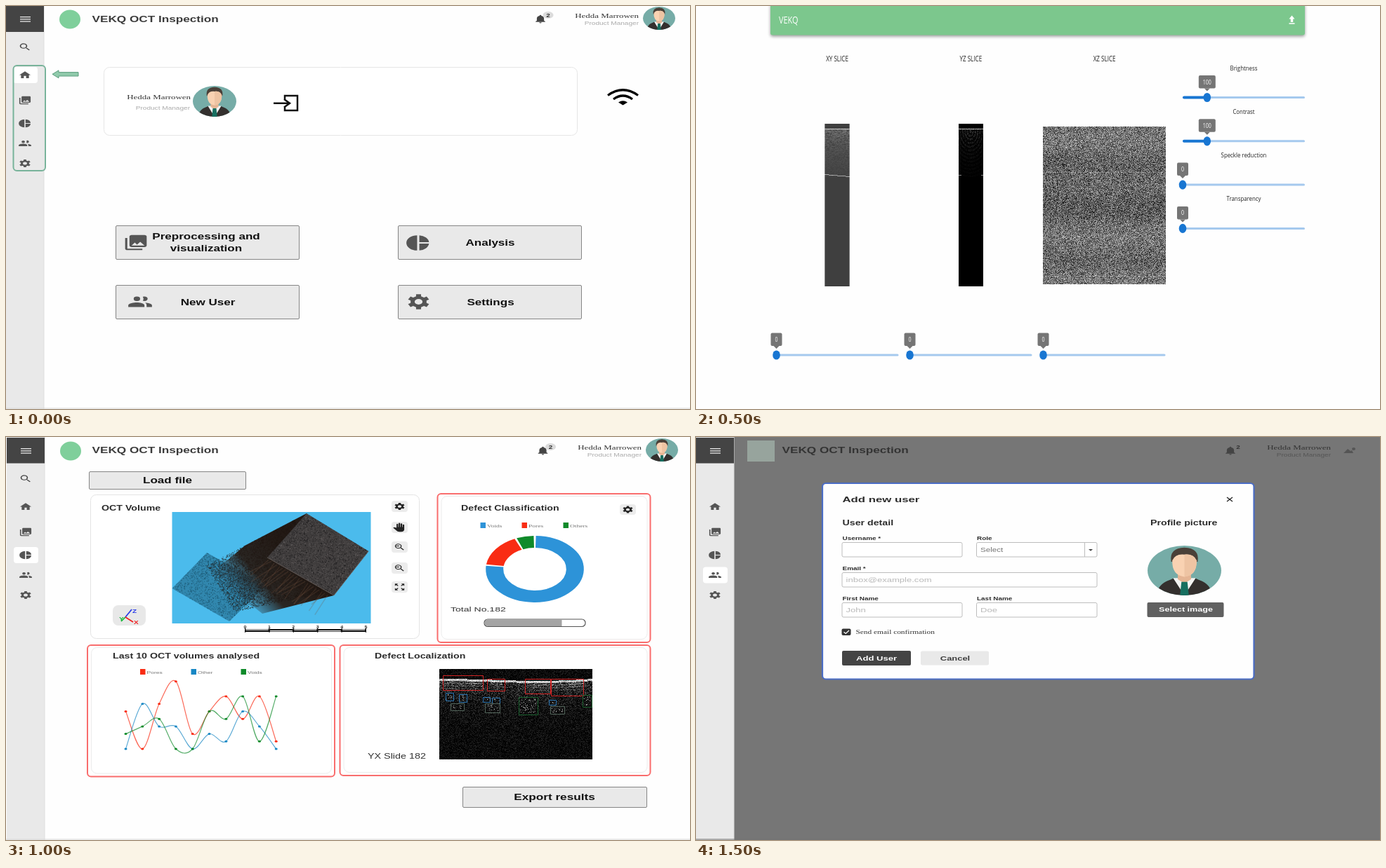
These frames come from a looping animation (974 by 575 pixels, 2 s). An HTML page with a canvas:

```html
<!DOCTYPE html>
<html lang="en">
<head>
<meta charset="utf-8">
<title>OCT inspection interface</title>
<style>
html, body { margin: 0; width: 974px; height: 575px; overflow: hidden; background: #fefefe; }
canvas { display: block; }
</style>
</head>
<body>
<canvas id="stage" width="974" height="575"></canvas>
<script>
const W = 974, H = 575, HOLD = 500;
const SANS = '"Liberation Sans", Arial, sans-serif';
const SERIF = '"Liberation Serif", Times, serif';
const UI = '"Open Sans", "Noto Sans", sans-serif';
const DARK = '#444', PANEL = '#e9e9e9', RED = '#f92c13', BLUE = '#2d93d8', GREEN = '#0f8a2a';

let g;          // context being painted
let wide = 1;   // horizontal aspect of the whole screen
let seed = 7;
const rand = () => (seed = (seed * 16807) % 2147483647) / 2147483647;

const ICONS = {
  home: 'M10 20v-6h4v6h5v-8h3L12 3 2 12h3v8z',
  search: 'M15.5 14h-.8l-.3-.3A6.5 6.5 0 1 0 13.7 14.4l.3.3v.8l5 5 1.5-1.5zm-6 0a4.5 4.5 0 1 1 0-9 4.5 4.5 0 0 1 0 9z',
  images: 'M22 16V4c0-1.1-.9-2-2-2H8c-1.1 0-2 .9-2 2v12c0 1.1.9 2 2 2h12c1.1 0 2-.9 2-2zm-11-4l2 2.7L16 11l4 5H8zM2 6v14c0 1.1.9 2 2 2h14v-2H4V6z',
  pie: 'M11 2v20a10 10 0 0 1 0-20zm2 0v9h9a10 10 0 0 0-9-9zm0 11v9a10 10 0 0 0 9-9z',
  people: 'M16 11a3 3 0 1 0-1.5-5.6q1.2 2.6 0 5.2a3 3 0 0 0 1.5.4zM9 11a3 3 0 1 0 0-6 3 3 0 0 0 0 6zm0 2c-2.6 0-8 1.2-8 3.7V19h15v-2.3c0-2.5-4.5-3.7-7-3.7zm7.5.1c1.2.9 1.5 2 1.5 3.5V19h5v-2.4c0-2-3.5-3.2-6.5-3.5z',
  bell: 'M12 22a2 2 0 0 0 2-2h-4a2 2 0 0 0 2 2zm6-6v-5c0-3.1-1.6-5.6-4.5-6.3V4a1.5 1.5 0 0 0-3 0v.7C7.6 5.4 6 7.9 6 11v5l-2 2v1h16v-1z',
  upload: 'M9 16h6v-6h4l-7-7-7 7h4zm-4 2h14v2H5z',
  expand: 'M15 3h6v6l-2.3-2.3-3 3-1.4-1.4 3-3zM3 9V3h6L6.700 5.300l3 3-1.400 1.400-3-3zM9 21H3v-6l2.300 2.300 3-3 1.400 1.400-3 3zM21 15v6h-6l2.300-2.300-3-3 1.400-1.400 3 3z',
  hand: 'M7 13V5a1.3 1.3 0 0 1 2.600 0v6h.7V3a1.300 1.300 0 0 1 2.600 0v8h.7V4a1.300 1.300 0 0 1 2.600 0v7h.7V6.500a1.300 1.300 0 0 1 2.600 0V17q0 5-5 5h-3q-3 0-5-3l-5-6q1.500-2 3-1z',
  gear: gearPath()
};

function gearPath() {
  let d = '';
  for (let i = 0; i < 24; i++) {
    const a = (Math.floor(i / 4) * 60 - 90 + [-13, 13, 18, 42][i % 4]) * Math.PI / 180;
    const r = i % 4 < 2 ? 10 : 7.4;
    d += `${i ? 'L' : 'M'}${12 + r * Math.cos(a)} ${12 + r * Math.sin(a)}`;
  }
  return d + 'zM8.4 12a3.6 3.6 0 1 0 7.200 0a3.600 3.600 0 1 0-7.200 0z';
}

function paint(path, fill, stroke, lw = 1) {
  if (fill) { g.fillStyle = fill; g.fill(path, 'evenodd'); }
  if (stroke) { g.strokeStyle = stroke; g.lineWidth = lw; g.stroke(path); }
}
const shape = (d, fill, stroke, lw) => paint(new Path2D(d), fill, stroke, lw);

function box(x, y, w, h, fill, stroke, r = 0, lw = 1) {
  const p = new Path2D();
  p.roundRect(x, y, w, h, r);
  paint(p, fill, stroke, lw);
}

function oval(x, y, rx, ry, fill) {
  const p = new Path2D();
  p.ellipse(x, y, rx, ry, 0, 0, 7);
  paint(p, fill);
}

function at(x, y, sx, sy, draw) {
  g.save();
  g.translate(x, y);
  g.scale(sx, sy);
  draw();
  g.restore();
}

function text(s, x, y, size, { color = '#333', align = 'left', font = SANS, bold = false } = {}) {
  at(x, y, wide, 1, () => {
    g.font = `${bold ? 'bold ' : ''}${size}px ${font}`;
    g.textAlign = align;
    g.fillStyle = color;
    g.fillText(s, 0, 0);
  });
}
const heading = (s, x, y, size = 10, align = 'left', color = '#2c2c2c') =>
  text(s, x, y, size, { bold: true, align, color });

function icon(name, x, y, k = 0.57, color = '#555') {
  at(x, y, k * wide, k, () => {
    g.translate(-12, -12);
    shape(ICONS[name], color);
  });
}

// One grey pixel per cell; shade() returns a brightness or null to skip.
function grain(x, y, w, h, shade) {
  for (let j = 0; j < h; j++) for (let i = 0; i < w; i++) {
    const v = shade(i, j);
    if (v === null) continue;
    const c = Math.max(0, Math.min(255, Math.round(v)));
    g.fillStyle = `rgb(${c},${c},${c})`;
    g.fillRect(x + i, y + j, 1, 1);
  }
}

function clipped(d, draw) {
  g.save();
  g.clip(new Path2D(d));
  draw();
  g.restore();
}

function avatar(x, y, rx, ry) {
  at(x, y, rx, ry, () => {
    oval(0, 0, 1, 1, '#76aca7');
    clipped('M-1 0A1 1 0 0 1 1 0A1 1 0 0 1-1 0z', () => {
      shape('M-.3.3h.6L.2 1h-.4z', '#f4f4f2');
      shape('M-.75 1C-.7.5-.5.45-.3.32L0 1zM.75 1C.7.5.5.45.3.32L0 1z', '#34302e');
      shape('M-.18-.1h.36v.45L0 .52l-.18-.17z', '#e5b594');
      shape('M-.08.46h.16L.12 1h-.24z', '#176f60');
      shape('M-.36-.35Q-.42-.9 0-.92Q.42-.9.36-.35z', '#4a4038');
      shape('M-.33-.4Q-.25-.68 0-.64Q.25-.68.33-.4Q.34.2 0 .25Q-.34.2-.33-.4z', '#f9d2b2');
      shape('M0-.64Q.25-.68.33-.4Q.34.2 0 .25z', '#eec4a3');
    });
  });
}

function person(x, y) {
  text('Hedda Marrowen', x, y, 9.1, { font: SERIF, align: 'right' });
}
const jobTitle = (x, y, color = '#aaa') => text('Product Manager', x, y, 7.1, { align: 'right', color });

function appFrame(dx, dy, active, dim = false) {
  wide = 1.42;
  g.fillStyle = dim ? '#767676' : '#fefefe';
  g.fillRect(0, 0, W, H);
  box(dx, 0, 54, H, PANEL);
  box(53.5 + dx, 0, 1, H, '#ddd');
  box(dx, dy, 54, 37 - dy / 2, DARK);
  for (const y of [15, 18.2, 21.4]) box(20 + dx, y + dy, 15, 1.3, '#e8e8e8');
  box(10 + dx, active - 11.5 + dy, 35, 23, '#fff', null, 4);
  if (!dim) icon('search', 27 + dx, 58.5 + dy, 0.57, '#444');
  const items = { home: 98.5, images: 134.5, pie: 167.5, people: 196, gear: 224.5 };
  for (const name in items) icon(name, 27 + dx, items[name] + dy);

  if (dim) box(73, 5, 39, 30, '#97a49d');
  else oval(91 + dx, 19 + dy, 15, 13.5, '#7fcf9b');
  heading('VEKQ OCT Inspection', 122.5, 22.5 + dy / 2, 12.1, 'left', dim ? '#343434' : '#3c3c3c');
  const bx = dx * 3.5;
  icon('bell', 761 + bx, 18.5 + dy, 0.6, DARK);
  if (!dim) oval(772 + bx, 13 + dy, 7.5, 5, '#dcdcdc');
  text('2', 772 + bx, 15.6 + dy, 7, { align: 'center', bold: true });
  const nx = dim ? 904 : 901 + dx * 4;
  person(nx, 16.5 + dy);
  jobTitle(nx, 26.5 + dy, dim ? '#555' : '#aaa');
  if (dim) shape('M922 23l6-6 4 3 2-1 2 4zM934 17a2.500 2 0 1 0 5 0a2.500 2 0 1 0-5 0z', '#555');
  else avatar(930 + dx * 4, 17.5 + dy, 23, 16.5);
  box(0, 573.5, W, 1, dim ? '#707070' : '#dadada');
}

const button = (x, y, w, h) => box(x + .5, y + .5, w, h, PANEL, '#858585', 1.5);

function home() {
  appFrame(0, 0, 98.5);
  box(10.500, 85, 45.500, 150, null, '#78b39a', 5, 2);
  shape('M66 97.300l9-5.500v2.800h28v5.400h-28v2.800z', '#90caab', '#5c9d7e');

  box(139.5, 87.5, 674, 97, '#fff', '#e6e6e6', 8);
  person(263, 132.5);
  jobTitle(262, 148);
  avatar(297, 136, 31, 22);
  shape('M397 133.500v-5.500h18v21h-18v-5.500M381 138.700h22M396 133l8 5.700-8 5.700', null, '#111', 2.500);
  shape('M857 127.500Q878.500 112 900 127.500M865 133Q878.500 123 892 133', null, '#000', 3.200);
  shape('M872 137.500Q878.500 133 885 137.500L878.500 141.500z', '#000');

  for (const x of [156, 558]) for (const y of [313, 398]) button(x, y, 261, 48);
  icon('images', 185, 337.500, 1.08);
  icon('people', 191, 422, 1.08);
  icon('pie', 587, 338, 1.08);
  icon('gear', 587.500, 422, 1.1);
  const caption = (s, x, y) => heading(s, x, y, 12, 'center', '#111');
  caption('Preprocessing and', 285, 333);
  caption('visualization', 285, 349.5);
  caption('New User', 287.5, 426.5);
  caption('Analysis', 689.5, 342);
  caption('Settings', 690, 426.5);
}

function slider(x, y, value, length = 174) {
  const knob = x + length * value / 500, half = value ? 12 : 8;
  box(x, y - 1.5, length, 3, '#a5c9ee', null, 1.5);
  if (value) box(x, y - 2, knob - x, 4, '#1876d2', null, 2);
  oval(knob, y, 5.3, 6.6, '#1876d2');
  box(knob - half, y - 31.5, half * 2, 18.5, '#757575', null, 2);
  shape(`M${knob - 4} ${y - 13}h8l-4 4z`, '#757575');
  text(String(value), knob, y - 19, 8.8, { color: '#fff', align: 'center', font: UI });
}

function viewer() {
  wide = 0.8;
  g.fillStyle = '#fefefe';
  g.fillRect(0, 0, W, H);
  g.save();
  g.shadowColor = 'rgba(0,0,0,.4)';
  g.shadowBlur = 4;
  g.shadowOffsetY = 2;
  box(106, -4, 761, 45.5, '#7cc78d', null, 3);
  g.restore();
  text('VEKQ', 118, 25, 13.6, { color: '#fff', font: UI });
  icon('upload', 848.5, 20, 0.72, '#fff');

  ['XY', 'YZ', 'XZ'].forEach((axis, i) => {
    text(`${axis} SLICE`, 201 + i * 190.3, 79, 10.1, { align: 'center', font: UI, color: '#222' });
    slider(114.5 + i * 190, 498, 0);
  });
  ['Brightness', 'Contrast', 'Speckle reduction', 'Transparency'].forEach((name, i) => {
    const y = 130.5 + i * 62.3;
    text(name, 780, y - 39, 9.8, { align: 'center', font: UI, color: '#222' });
    slider(693, y, i < 2 ? 100 : 0);
  });

  grain(183.5, 168, 35, 232, (i, j) => {
    if (j === 7) return 150 + 70 * rand();
    if (j === Math.round(72 + i / 12)) return 110 + 50 * rand();
    return j < 7 || j > 75 ? 0 : 90 * rand() * Math.exp((8 - j) / 32);
  });
  grain(374, 168, 35, 232, (i, j) => {
    if (j === 7) return 150 + 70 * rand();
    if (j === 73 && (i < 4 || i > 31)) return 130;
    if (j < 7 || j > 75) return 0;
    const r = Math.hypot(i - 16, (j - 10) / 1.6);
    return rand() * (60 + 50 * Math.sin(r * 1.9)) * Math.exp((8 - j) / 25 - Math.abs(i - 16) / 26);
  });
  grain(494, 172, 175, 225, (i, j) => {
    const band = 9 * Math.sin(j / 11) - 16 * Math.exp(-(((j - 95) / 35) ** 2));
    const line = j === 65 ? 30 : j === 213 ? 22 : 0;
    const ring = i < 26 ? 13 * Math.sin(Math.hypot(i + 12, (j - 95) / 2) * 1.1) * Math.exp(-(((j - 95) / 30) ** 2)) : 0;
    return 112 + band + line + ring + (rand() + rand() - 1) * 100;
  });
}

function legend(x, y, color, name, font, size) {
  box(x, y, 7.5, 8, color);
  text(name, x + 9.5, y + 6.5, size, { font, color: '#777' });
}

function volume() {
  box(120.5, 82.5, 468, 205, '#fff', '#e4e4e4', 8);
  heading('OCT Volume', 136, 105);
  box(236.5, 107, 283, 159, '#4bbbec');
  const speckle = (n, color, spread) => {
    g.fillStyle = color;
    for (let i = 0; i < n; i++) {
      const [x, y] = spread();
      g.fillRect(x, y, 1, 1);
    }
  };
  const anywhere = () => [236 + 284 * rand(), 107 + 159 * rand()];
  clipped('M286 165L236.500 216L318 263L370 212z', () => {
    box(236, 107, 284, 159, 'rgba(25,85,115,.5)');
    speckle(9000, 'rgba(10,45,60,.4)', anywhere);
  });
  const fade = g.createLinearGradient(400, 160, 322, 225);
  fade.addColorStop(0, '#231a15');
  fade.addColorStop(.55, 'rgba(40,30,24,.95)');
  fade.addColorStop(1, 'rgba(40,45,50,0)');
  shape('M428 109L340 155L292 195L365 252L467 226z', fade);
  // Loose grains trail off along the depth of the block.
  speckle(6500, 'rgba(35,25,20,.65)', () => {
    const s = rand(), t = rand() ** 1.5;
    return [410 + 40 * s - 125 * t, 118 + 105 * s + 65 * t * (1 - .6 * s)];
  });
  for (let i = 0; i < 22; i++) {
    const x = 374 + i * 4, y = 175 + i * 2.4;
    shape(`M${x} ${y}l${-18 - 20 * rand()} ${14 + 16 * rand()}`, null, 'rgba(120,85,65,.25)', 1.5);
  }
  clipped('M428 109L516.500 163L467 226L372 172z', () => {
    box(360, 107, 160, 125, '#403d3d');
    speckle(6500, 'rgba(12,12,14,.5)', anywhere);
    speckle(6500, 'rgba(125,120,120,.4)', anywhere);
  });
  shape('M372 172L467 226L516 163', null, 'rgba(125,115,110,.6)');

  [['gear', 99], ['hand', 129], ['search', 157], ['search', 187], ['expand', 214]].forEach(([name, y]) => {
    box(549, y - 8, 23, 16, '#ececec', null, 4);
    icon(name, 560.5, y, name === 'hand' ? 0.62 : 0.52, '#222');
    if (name === 'search') box(556, y - 2, 4, 1, '#222');
  });
  box(152, 240, 47, 29, '#e8e8e8', null, 8);
  [['#2638e8', 'Z', 179, 246, 180, 251], ['#18b83a', 'Y', 164, 263, 161, 262], ['#f02020', 'X', 181, 264, 182, 267]]
    .forEach(([color, name, x, y, tx, ty]) => {
      shape(`M170 257L${x} ${y}`, null, color, 1.7);
      text(name, tx, ty, 7, { color, bold: true });
    });
  box(340, 274, 173, 4, '#111');
  for (let i = 0; i < 6; i++) {
    const x = 340.5 + 34.4 * i;
    text(String(i), x, 273, 5, { align: 'center', bold: true });
    box(x - .5, 272, 1, 7, '#111');
    if (i < 5) box(x + 1, i % 2 ? 276 : 274.5, 32, 1.3, '#fff');
  }
}

function redCard(x, y, w, h) {
  box(x, y, w, h, '#fff', '#f96d6d', 5, 2);
  box(x + 5.5, y + 3.5, w - 10, h - 8, null, '#ececec', 8);
}

function classification() {
  redCard(614.5, 81, 303, 212);
  heading('Defect Classification', 648, 105);
  box(874, 96, 23, 15, '#ececec', null, 4);
  icon('gear', 885.5, 103.5, 0.52, '#222');
  legend(675.5, 122, BLUE, 'Voids', SERIF, 6.7);
  legend(734.5, 122, RED, 'Pores', SERIF, 6.7);
  legend(793.5, 122, GREEN, 'Others', SERIF, 6.7);
  at(753, 188.5, 1.47, 1, () => {
    [[-90, 187, BLUE], [187, 247, RED], [247, 270, GREEN]].forEach(([from, to, color]) => {
      const p = new Path2D();
      p.arc(0, 0, 39, (from + 1.3) * Math.PI / 180, (to - 1.3) * Math.PI / 180);
      paint(p, null, color, 17);
    });
  });
  text('Total No.182', 633, 249, 9.9);
  box(681, 260, 144, 10.5, '#fff', '#555', 5, 1.2);
  box(681.5, 260.5, 110, 9.5, '#a4a4a4', null, [5, 0, 0, 5]);
}

function curve(values, color) {
  const points = values.map((v, i) => [170.5 + 23.8 * i, 445 - 10.7 * v]);
  const near = i => points[Math.max(0, Math.min(points.length - 1, i))];
  const p = new Path2D();
  p.moveTo(...points[0]);
  for (let i = 0; i < points.length - 1; i++) {
    const [a, b, c, d] = [-1, 0, 1, 2].map(k => near(i + k));
    p.bezierCurveTo(b[0] + (c[0] - a[0]) / 6, b[1] + (c[1] - a[1]) / 6,
      c[0] - (d[0] - b[0]) / 6, c[1] - (d[1] - b[1]) / 6, ...c);
  }
  g.globalAlpha = .7;
  paint(p, null, color, 1.2);
  g.globalAlpha = 1;
  for (const [x, y] of points) oval(x, y, 2, 1.5, color);
}

function history() {
  redCard(116, 297, 352, 187.5);
  heading('Last 10 OCT volumes analysed', 152, 315.5);
  legend(191, 331, RED, 'Pores', SANS, 6);
  legend(263.5, 331, '#1787c4', 'Other', SANS, 6);
  legend(334.5, 331, GREEN, 'Voids', SANS, 6);
  curve([5, 0, 6, 9, 2, 5, 7, 4, 7, 1], RED);
  curve([0, 6, 3, 3, 0, 2, 1, 5, 3, 0], '#1787c4');
  curve([2, 3, 4, 0, 0, 5, 4, 7, 1, 7], GREEN);
}

function localization() {
  redCard(475.5, 297, 442, 186);
  heading('Defect Localization', 525, 315.5);
  text('YX Slide 182', 515, 458.5, 10.1);
  grain(617, 331, 218, 129, (i, j) => {
    const d = j - 15 - 5 * Math.sin(i / 218 * Math.PI) * (i / 218);
    const hot = i < 62 || (i > 72 && i < 90) || (i > 124 && i < 206);
    if (Math.abs(d) < 1.5) return 150 + 100 * rand();
    if (d < 0) return 35 * rand() ** 2;
    const stripes = hot && d < 18 ? 70 * (1 + Math.sin(d * 1.7)) * (1 - d / 18) : 0;
    return rand() ** 2 * (35 + 120 * Math.exp(-d / 22)) + stripes * rand();
  });
  const marks = {
    '#d02424': [[622, 340, 57, 21], [685, 345, 25, 17], [739, 345, 36, 21], [776, 345, 46, 24]],
    '#2e78b4': [[626, 365, 11, 11], [645, 367, 11, 11], [679, 371, 10, 7], [692, 372, 11, 8], [773, 375, 10, 7]],
    '#52645a': [[633, 380, 19, 10], [682, 380, 21, 13], [775, 384, 20, 11]],
    '#1c6230': [[730, 371, 27, 25], [821, 368, 13, 17]]
  };
  for (const color in marks) for (const [x, y, w, h] of marks[color]) {
    if (color !== '#d02424') grain(x + 2, y + 2, w - 4, h - 4, () => rand() > .9 ? 110 + 110 * rand() : null);
    box(x + .5, y + .5, w, h, null, color);
  }
}

function analysis() {
  appFrame(1, 1, 167.5);
  button(118, 49, 223, 25);
  heading('Load file', 230, 66, 12, 'center', '#111');
  volume();
  classification();
  history();
  localization();
  button(650, 499, 262, 29);
  heading('Export results', 781, 518, 12.1, 'center', '#111');
}

function field(name, x, y, w, hint = '', color = '#b9b9b9', size = 9.2) {
  heading(name, x + 1, y - 3, 7);
  box(x + .5, y + .5, w, 20.5, '#fff', '#bdbdbd', 2);
  text(hint, x + 6, y + 13.5, size, { color });
}

function newUser() {
  appFrame(0, 1, 196, true);
  box(180, 66, 614.5, 279.5, '#fefefe', '#4a6cc4', 5, 2.2);
  heading('Add new user', 208.5, 93, 11.8);
  shape('M756 86l8 6M764 86l-8 6', null, '#222', 1.3);
  heading('User detail', 208.5, 125.5);
  heading('Profile picture', 647, 125.5);
  field('Username *', 207.5, 150, 171);
  field('Role', 399, 150, 171.5, 'Select', '#777', 8.2);
  shape('M553.500 150.500v20.500', null, '#bdbdbd');
  shape('M559 160h6l-3 2.800z', '#444');
  field('Email *', 207.5, 193, 363, 'inbox@example.com');
  field('First Name', 207.5, 236, 171, 'John');
  field('Last Name', 399, 236, 171.5, 'Doe');
  box(207.5, 273.5, 13, 9.5, '#333', null, 2);
  shape('M210.500 278.300l2.700 2.200 4.800-4.500', null, '#fff', 1.3);
  text('Send email confirmation', 227.5, 281, 8, { font: SERIF });
  box(208, 305, 98, 21, DARK, null, 2);
  heading('Add User', 257, 318.5, 9.2, 'center', '#fff');
  box(320, 305.5, 97, 20, PANEL, null, 2);
  heading('Cancel', 369, 318.5, 9.1, 'center', '#3c3c3c');
  avatar(695.5, 190.5, 52.5, 35.5);
  box(642.5, 236, 109, 21, '#606060', null, 2);
  heading('Select image', 697.5, 249, 8.9, 'center', '#fff');
}

const screens = [home, viewer, analysis, newUser].map(draw => {
  const canvas = document.createElement('canvas');
  canvas.width = W;
  canvas.height = H;
  g = canvas.getContext('2d');
  draw();
  return canvas;
});

const stage = document.getElementById('stage').getContext('2d');
let start;
function tick(now) {
  start ??= now;
  stage.drawImage(screens[Math.floor((now - start) / HOLD) % screens.length], 0, 0);
  requestAnimationFrame(tick);
}
requestAnimationFrame(tick);
</script>
</body>
</html>
```
